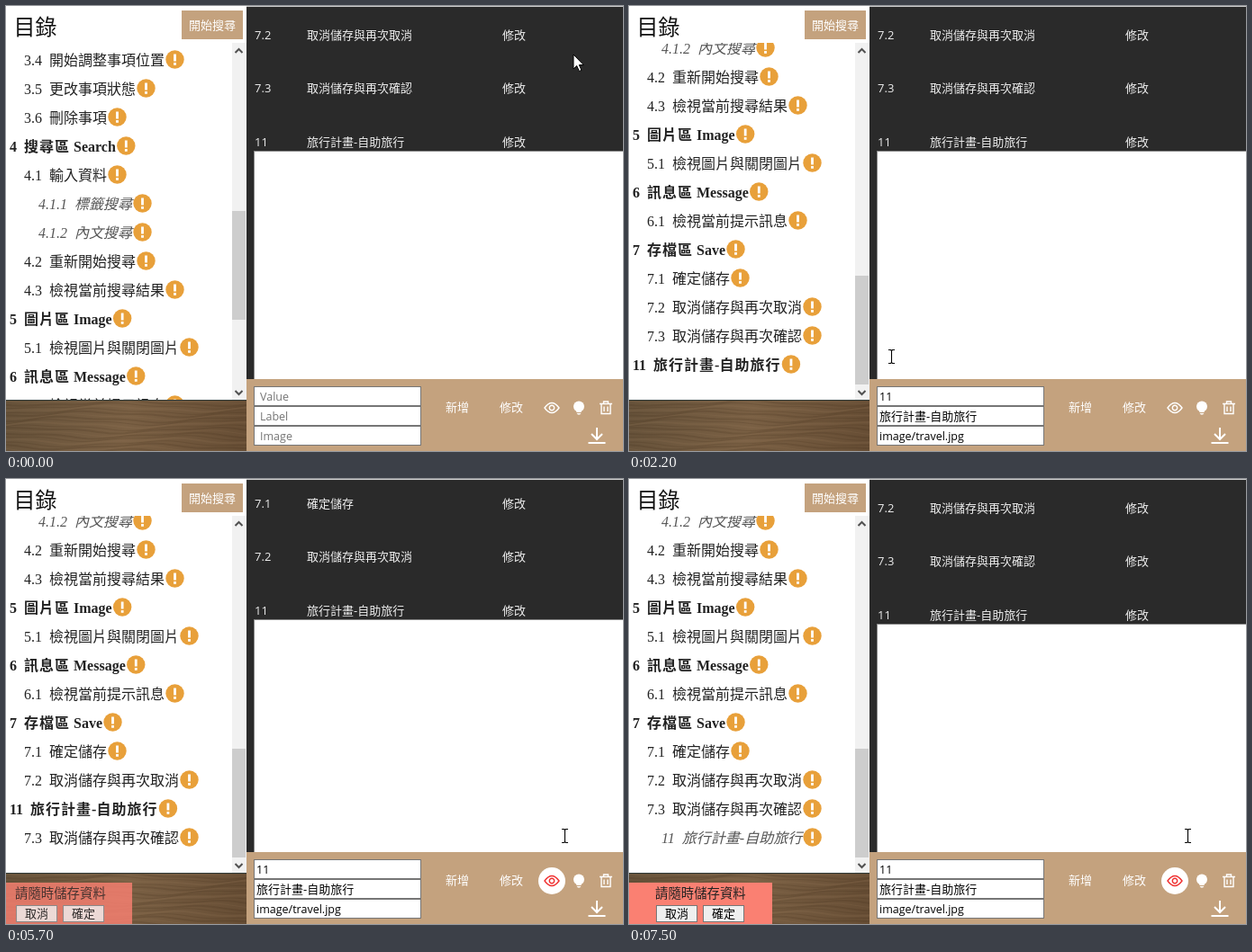
These frames come from a looping animation (685x495 px, 8 s). An HTML page with a canvas:

```html
<!DOCTYPE html>
<html lang="zh-Hant">
<head>
<meta charset="utf-8">
<style>
html, body { margin: 0; width: 685px; height: 495px; overflow: hidden; }
canvas { display: block; }
</style>
</head>
<body>
<canvas id="stage" width="685" height="495"></canvas>
<script>
const ctx = document.getElementById('stage').getContext('2d');
const LOOP = 8000, TAN = '#c4a27e';
const SANS = '"Open Sans", "Noto Sans CJK TC", "Noto Sans CJK", sans-serif';
const SERIF = '"Liberation Serif", "Noto Sans CJK TC", "Noto Sans CJK", serif';
const TRIP = ['11', '旅行計畫-自助旅行'];
const ITEMS = `3.4 開始調整事項位置|3.5 更改事項狀態|3.6 刪除事項|4 搜尋區 Search|4.1 輸入資料
|4.1.1 標籤搜尋|4.1.2 內文搜尋|4.2 重新開始搜尋|4.3 檢視當前搜尋結果|5 圖片區 Image|5.1 檢視圖片與關閉圖片
|6 訊息區 Message|6.1 檢視當前提示訊息|7 存檔區 Save|7.1 確定儲存|7.2 取消儲存與再次取消|7.3 取消儲存與再次確認`
  .replace(/\n/g, '').split('|').map(line => [line.split(' ')[0], line.slice(line.indexOf(' ') + 1)]);

// Pointer path: time, x, y
const PATH = [[0, 630, 54], [100, 625, 60], [500, 256, 278], [600, 256, 278], [900, 256, 350], [1000, 256, 350],
  [1500, 145, 402], [1700, 145, 402], [2200, 291, 390], [2400, 320, 388], [3100, 602, 442],
  [4200, 602, 442], [4600, 620, 397], [LOOP, 620, 397]];

const clamp = v => Math.max(0, Math.min(1, v));
const between = (t, a, b) => t >= a && t < b;

function rect(x, y, w, h, fill, border) {
  ctx.fillStyle = fill;
  ctx.fillRect(x, y, w, h);
  if (border) {
    ctx.strokeStyle = border;
    ctx.lineWidth = 1;
    ctx.strokeRect(x + .5, y + .5, w - 1, h - 1);
  }
}

function disc(x, y, r, fill) {
  ctx.fillStyle = fill;
  ctx.beginPath();
  ctx.arc(x, y, r, 0, 7);
  ctx.fill();
}

function path(d, x, y, stroke, width, fill) {
  const shape = new Path2D(d);
  ctx.save();
  ctx.translate(x, y);
  if (fill) { ctx.fillStyle = fill; ctx.fill(shape); }
  if (stroke) { ctx.strokeStyle = stroke; ctx.lineWidth = width; ctx.stroke(shape); }
  ctx.restore();
}

function text(str, x, y, color, size = 13, family = SANS, style = '') {
  ctx.font = `${style} ${size}px ${family}`;
  ctx.fillStyle = color;
  ctx.fillText(str, x, y + size * .36);
  return ctx.measureText(str).width;
}

function clipped(x, y, w, h, draw) {
  ctx.save();
  ctx.beginPath();
  ctx.rect(x, y, w, h);
  ctx.clip();
  draw();
  ctx.restore();
}

function drawEntry([num, label], level, y) {
  const style = ['bold', '', 'italic'][level];
  const color = level === 2 ? '#555' : '#222';
  let x = 4 + 16 * level;
  x += text(num, x, y, color, 16, SERIF, style) + 8;
  for (const part of label.split(/([\u4e00-\u9fff]+)/)) {
    // Bold ideographs are set one pixel wider
    ctx.letterSpacing = level === 0 && part > '\u4e00' ? '1px' : '0px';
    x += text(part, x, y, color, 16, SERIF, style);
  }
  ctx.letterSpacing = '0px';
  disc(x + 11.5, y - .5, 10.2, '#e8a03a');
  rect(x + 10.1, y - 6.5, 2.8, 8, '#fff');
  rect(x + 10.1, y + 3, 2.8, 2.8, '#fff');
}

function drawWood() {
  const shade = ctx.createLinearGradient(0, 438, 267, 495);
  shade.addColorStop(0, '#66523a');
  shade.addColorStop(.5, '#7a6044');
  shade.addColorStop(1, '#664d34');
  rect(0, 438, 267, 57, shade);
  clipped(0, 438, 267, 57, () => {
    for (let i = 0; i < 20; i++) {
      ctx.strokeStyle = i % 3 ? 'rgba(60,42,24,.16)' : 'rgba(165,135,98,.12)';
      ctx.lineWidth = 1 + i % 2;
      ctx.beginPath();
      for (let x = 0; x <= 270; x += 6)
        ctx.lineTo(x, 439 + i * 3 + 2.5 * Math.sin(x / 31 + i * .35) + Math.sin(x / 13 + i));
      ctx.stroke();
    }
  });
  rect(0, 438, 267, 1, '#2f3a38');
}

function drawOutline(t, items, tripLevel) {
  const scroll = 205 * clamp((t - 600) / 300);
  const thumb = 228 + 72 * scroll / 205;
  rect(0, 0, 267, 438, '#fff');
  clipped(0, 41, 251, 397, () => items.forEach((item, i) => {
    const level = item === TRIP ? tripLevel : item[0].split('.').length - 1;
    drawEntry(item, level, 60 + 32 * i - scroll);
  }));
  text('目錄', 8.5, 23, '#111', 24, SERIF, '500');
  rect(195, 5, 68, 32, TAN);
  text('開始搜尋', 203, 21, '#fff');
  rect(251, 41, 16, 397, '#f1f1f1');
  rect(251, thumb, 15, 121, between(t, 700, 1100) ? '#606060' : '#cdcdcd');
  path('M-4 2L0-2L4 2', 258.5, 50, '#505050', 2);
  path('M-4-2L0 2L4-2', 258.5, 430, '#505050', 2);
}

function drawTable(items, ups) {
  const top = [32, 27, 14][ups];
  const last = items.indexOf(TRIP);
  rect(267, 0, 418, 415, '#2a2a2a');
  rect(267, 0, 418, 1, '#ccc');
  for (let i = 0; i < 3; i++) {
    const y = top + 59.5 * i;
    const [num, label] = items[last - 2 + i];
    text(num, 276, y, '#eee');
    text(label, 334, y, '#eee');
    text('修改', 551, y, '#eee');
  }
  // The text area runs on below the toolbar and past the right edge
  rect(275, top + 129, 420, 300, '#fff', '#888');
}

function drawToolbar(t) {
  rect(267, 415, 418, 80, TAN);
  const filled = t >= 1700;
  const values = filled ? [...TRIP, 'image/travel.jpg'] : ['Value', 'Label', 'Image'];
  values.forEach((value, i) => {
    const y = 423 + 22 * i;
    rect(275, y, 186, 22, '#fff', '#767676');
    text(value, filled ? 278 : 282, y + 11.5, filled ? '#000' : '#757575', i === 1 && filled ? 13 : 12.5);
  });
  text('新增', 488, 446, '#fff');
  text('修改', 548, 446, '#fff');

  const active = t >= 3600;
  const eye = active ? '#f03030' : '#fff';
  if (active) disc(606, 447, 15, '#fff');
  path('M-8 0Q0-11 8 0Q0 11-8 0Z', 606, 447, eye, between(t, 3600, 4300) ? 2.6 : 1.4);
  path('M2.7 0A2.7 2.7 0 1 1-2.7 0A2.7 2.7 0 1 1 2.7 0', 606, 447, eye, 1.4);

  disc(636, 445.5, 6, '#fff');
  path('M-3.5 3H3.5L2.5 7H-2.5ZM-2.5 8H2.5L1 9.5H-1Z', 636, 445, null, 0, '#fff');
  path('M-7-4.5H7M-2.5-4.5V-7H2.5V-4.5M-5-4.5V6.5H5V-4.5M-2-1.5V4M2-1.5V4', 666, 447, '#fff', 1.4);
  path('M0-9V4M-6-2L0 4L6-2M-9.5 8H9.5', 656, 478, '#fff', 2);
}

function drawNotice(t) {
  const p = clamp((t - 5250) / 900);
  if (!p) return;
  const eased = 1 - (1 - p) ** 2.4;
  ctx.save();
  ctx.globalAlpha = eased;
  ctx.translate(-100 * (1 - eased), 0);
  rect(0, 449, 159, 46, '#fa8072');
  text('請隨時儲存資料', 29, 461, '#222', 14.4);
  [['取消', 30], ['確定', 82]].forEach(([label, x]) => {
    rect(x, 474, 46, 19, '#efefef', '#767676');
    text(label, x + 10, 483.5, '#000');
  });
  ctx.restore();
}

function drawPointer(t) {
  const i = Math.max(1, PATH.findIndex(k => k[0] > t));
  const [a, b] = [PATH[i - 1], PATH[i]];
  const p = clamp((t - a[0]) / (b[0] - a[0]));
  const x = a[1] + (b[1] - a[1]) * p, y = a[2] + (b[2] - a[2]) * p;
  if (x > 275 && between(y, 161, 415))
    path('M-3.5-7.5H-1L0-6.5L1-7.5H3.5M0-6.5V6.5M-3.5 7.5H-1L0 6.5L1 7.5H3.5', x + .5, y, '#000', 1.1);
  else
    path('M0 0V16L3.7 12.5L6.4 18.5L9 17.4L6.3 11.6H11.3Z', x, y, '#000', 1, '#fff');
}

function draw(now) {
  const t = Math.floor(now % LOOP / 100) * 100;
  const ups = between(t, 5900, 6200) ? 2 : between(t, 5300, 6800) ? 1 : 0;
  const tripLevel = (t >= 7200) + (t >= 7500);
  const items = [...ITEMS];
  items.splice(items.length - ups, 0, TRIP);
  drawTable(items, ups);
  drawToolbar(t);
  drawWood();
  drawOutline(t, items, tripLevel);
  drawNotice(t);
  drawPointer(t);
}

const start = performance.now();
(function tick() {
  draw(performance.now() - start);
  requestAnimationFrame(tick);
})();
</script>
</body>
</html>
```
